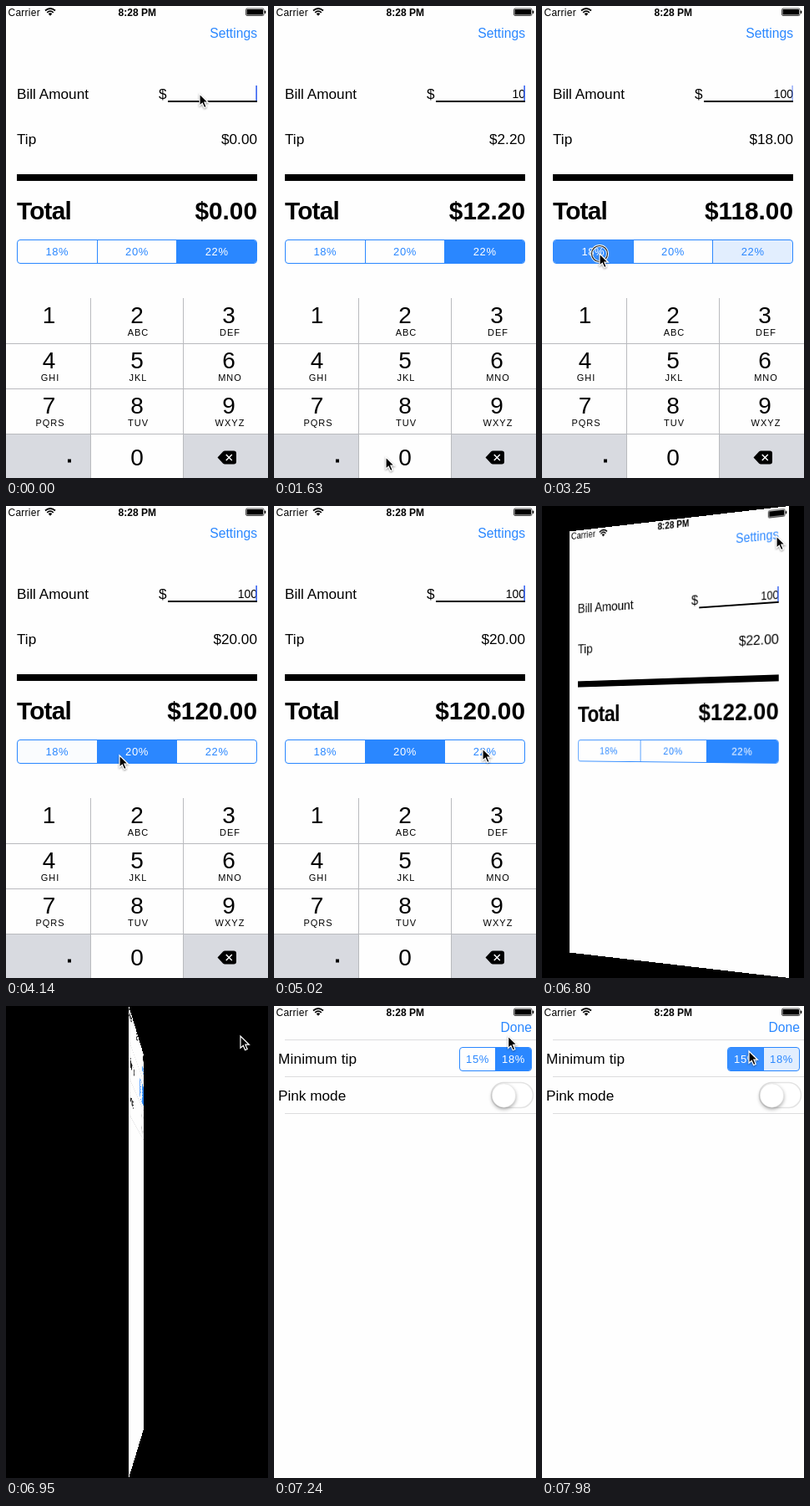
These frames come from a looping animation (314x564 px, 8 s). An HTML page:

```html
<!DOCTYPE html>
<html lang="en">
<head>
<meta charset="utf-8">
<title>Tip calculator</title>
<style>
  html, body { margin: 0; width: 100%; height: 100%; overflow: hidden; background: #000; }
  #stage { position: relative; width: 314px; height: 564px; overflow: hidden; background: #000; perspective: 1210px; }
  .page { position: absolute; inset: 0; overflow: hidden; background: #fefefe; }
  svg { position: absolute; left: 0; top: 0; overflow: visible; }
  text, .seg { font-family: "Liberation Sans", Arial, sans-serif; }
  .status { font-size: 12px; }
  .link { font-size: 15.7px; fill: #2a87ff; }
  .label { font-size: 17.2px; }
  .field { font-size: 14px; }
  .total { font-size: 29.8px; font-weight: bold; }
  .digit { font-size: 28px; text-anchor: middle; }
  .letters { font-size: 11px; letter-spacing: 1px; text-anchor: middle; }
  .end { text-anchor: end; }
  .seg { position: absolute; display: flex; box-sizing: border-box; border: 1px solid #2a87ff; border-radius: 4px;
         overflow: hidden; font-size: 13px; letter-spacing: .6px; text-align: center; line-height: 27px; }
  .seg span { flex: 1; }
  .seg span + span { border-left: 1px solid #2a87ff; }
</style>
</head>
<body>
<div id="stage">
  <div class="page" id="calc">
    <svg width="314" height="564">
      <g class="bar"></g>
      <text id="settings" class="link end" x="301" y="38">Settings</text>
      <text class="label" x="13" y="110.500">Bill Amount</text>
      <text class="label" x="183" y="110.500">$</text>
      <text id="bill" class="field end" x="301" y="110"></text>
      <rect id="caret" x="299.300" y="95" width="1.700" height="20" fill="#426bf2"/>
      <rect x="194" y="113" width="107" height="2"/>
      <text class="label" x="13" y="164.500">Tip</text>
      <text id="tip" class="label end" x="301" y="164.500"></text>
      <rect x="13" y="201" width="288" height="8"/>
      <text class="total" x="13" y="255" letter-spacing="-.8">Total</text>
      <text id="total" class="total end" x="301" y="255"></text>
    </svg>
    <div class="seg" id="rates" style="left:13px;top:279px;width:288px;height:29px"></div>
    <svg width="314" height="564"><g id="keys"></g></svg>
  </div>
  <div class="page" id="prefs">
    <svg width="314" height="564">
      <g class="bar"></g>
      <text class="link end" x="309" y="31">Done</text>
      <path d="M13 40.500H314M13 84.500H314M13 128.500H314" stroke="#dcdcde"/>
      <text class="label" x="5" y="68.500" letter-spacing=".15">Minimum tip</text>
      <text class="label" x="5" y="112.500">Pink mode</text>
      <rect x="260.500" y="91.500" width="50" height="30" rx="15" fill="#fff" stroke="#e3e3e3" stroke-width="1.500"/>
      <circle cx="275.500" cy="107" r="14.200" fill="#fff" stroke="#ddd" stroke-width=".6"
        style="filter:drop-shadow(0 2px 2px #0005)"/>
    </svg>
    <div class="seg" id="minimum" style="left:222px;top:49px;width:87px;height:29px"></div>
  </div>
  <svg width="314" height="564">
    <g id="cursor">
      <g id="ring" fill="none"><circle r="9.500" stroke="#fff" stroke-width="3"/><circle r="9.500" stroke="#222" stroke-width="1.200"/></g>
      <path d="M0 0V14.200L3.300 11.200 5.600 16.600 8.200 15.500 5.900 10.200H10.400Z" stroke="#fff" stroke-width="1.200"
        style="filter:drop-shadow(0 1px 1px #0006)"/>
    </g>
  </svg>
</div>
<script>
const $ = id => document.getElementById(id);
const clamp = v => Math.min(1, Math.max(0, v));
const ramp = (t, a, b) => clamp((t - a) / (b - a));
const ease = p => (1 - Math.cos(Math.PI * p)) / 2;

const LOOP = 8000, PRESS = 140;
const clicks = [740, 1440, 1780, 3250, 3990, 5050, 6500];
const typed = [[0, 0], [880, 1], [1580, 10], [1920, 100]];
const picks = [[-999, 2], [3250, 0], [3990, 1], [5050, 2]];
const minPicks = [[-999, 1], [7980, 0]];
const path = [
  [0, 232, 105], [140, 232, 105], [640, 50, 374], [880, 50, 374], [1180, 134, 539],
  [1950, 134, 539], [2360, 112, 296], [2950, 69, 296], [3400, 69, 296], [3840, 136, 298],
  [4150, 136, 298], [4280, 140, 292], [4900, 250, 290], [5470, 250, 290], [6200, 283, 41],
  [6550, 283, 41], [6800, 281, 36], [7200, 281, 36], [7830, 248, 54]
];

// Shared status bar
document.querySelectorAll('.bar').forEach(g => g.innerHTML = `
  <text class="status" x="2.500" y="11.500" letter-spacing=".25">Carrier</text>
  <path d="M47 5.500Q53 .5 59 5.500M49.200 7.800Q53 4.600 56.800 7.800" fill="none" stroke="#000" stroke-width="1.700"/>
  <path d="M50.700 9.200Q53 7.400 55.300 9.200L53 11.700Z"/>
  <text class="status" x="157.300" y="11.500" text-anchor="middle" font-weight="bold">8:28 PM</text>
  <rect x="287.500" y="3" width="21.500" height="8.500" rx="1.500" fill="none" stroke="#000" stroke-width=".7"/>
  <rect x="288.500" y="4" width="19.500" height="6.500" rx=".6"/>
  <rect x="309.800" y="5.500" width="1.500" height="3.500" rx=".7"/>`);

function buildKeys() {
  const names = ['', 'ABC', 'DEF', 'GHI', 'JKL', 'MNO', 'PQRS', 'TUV', 'WXYZ'];
  const columns = [51.5, 157, 267];
  let out = `<rect y="349" width="314" height="215" fill="#fefefe"/>
    <path d="M0 511H101V564H0ZM212 511H314V564H212Z" fill="#d8dae0"/>
    <rect id="key1" y="349" width="101" height="54" fill="#d8dae0"/>
    <rect id="key0" x="102" y="512" width="110" height="52" fill="#d8dae0"/>
    <path d="M101.500 349V564M212.500 349V564M0 403.500H314M0 457.500H314M0 511.500H314" stroke="#b9babe"/>`;
  names.forEach((name, i) => {
    const x = columns[i % 3], y = 379 + 54 * Math.floor(i / 3);
    out += `<text class="digit" x="${x}" y="${y}">${i + 1}</text>
      <text class="letters" x="${x + 1.5}" y="${y + 15}">${name}</text>`;
  });
  $('keys').innerHTML = out + `<text class="digit" x="157" y="549">0</text>
    <rect x="74" y="541.500" width="4" height="4"/>
    <path d="M253.500 539.500L260 532.600Q261 531.500 262.500 531.500H273Q276 531.500 276 534.500V544.500Q276 547.500 273 547.500H262.500Q261 547.500 260 546.400Z"/>
    <path d="M263.800 536L270.800 543M270.800 536L263.800 543" stroke="#fff" stroke-width="1.500"/>`;
}

const segment = (id, labels) => $(id).innerHTML = labels.map(s => `<span>${s}</span>`).join('');
const last = (events, t) => events.findLastIndex(e => e[0] <= t);

function drawSegment(id, events, t) {
  const n = last(events, t), [time, now] = events[n];
  const ghost = .13 * (1 - ramp(t, time, time + 170));
  [...$(id).children].forEach((span, i) => {
    const fill = i === now ? 1 - ghost / 2 : n && i === events[n - 1][1] ? ghost : 0;
    span.style.background = `rgba(42,135,255,${fill})`;
    span.style.color = i === now ? '#fff' : '#2a87ff';
  });
  return now;
}

function turn(id, angle, visible) {
  const depth = 157 * Math.abs(Math.sin(angle));
  $(id).style.visibility = visible ? 'visible' : 'hidden';
  $(id).style.transform = angle ? `translateZ(${-depth}px) rotateY(${angle}rad)` : 'none';
}

function pointer(t) {
  const i = path.findLastIndex(p => p[0] <= t);
  const a = path[i], b = path[i + 1] || a;
  const p = a === b ? 0 : ease(ramp(t, a[0], b[0]));
  return [a[1] + (b[1] - a[1]) * p, a[2] + (b[2] - a[2]) * p];
}

function draw(t) {
  const held = time => t >= time && t < time + PRESS;
  const show = (id, on) => $(id).style.opacity = +on;
  const money = v => '$' + v.toFixed(2);

  const [typedAt, amount] = typed[last(typed, t)];
  const rate = [.18, .2, .22][drawSegment('rates', picks, t)];
  $('bill').textContent = amount || '';
  $('tip').textContent = money(amount * rate);
  $('total').textContent = money(amount * (1 + rate));
  drawSegment('minimum', minPicks, t);

  const blink = (t - typedAt) % 1000;
  show('caret', 1 - ramp(blink, 240, 420) + ramp(blink, 600, 750));
  show('key1', held(clicks[0]));
  show('key0', held(clicks[1]) || held(clicks[2]));
  show('settings', held(clicks[6]) ? .3 : 1);
  show('ring', clicks.some(held));
  $('keys').setAttribute('transform', `translate(0 ${215 * ease(ramp(t, 6560, 6800))})`);

  const flip = Math.PI * ease(ramp(t, 6650, 7237));
  const front = flip < Math.PI / 2;
  turn('calc', -flip, front);
  turn('prefs', Math.PI - flip, !front);

  $('cursor').setAttribute('transform', `translate(${pointer(t)})`);
}

buildKeys();
segment('rates', ['18%', '20%', '22%']);
segment('minimum', ['15%', '18%']);
const start = performance.now();
function tick() {
  draw((performance.now() - start) % LOOP);
  requestAnimationFrame(tick);
}
tick();
</script>
</body>
</html>
```
